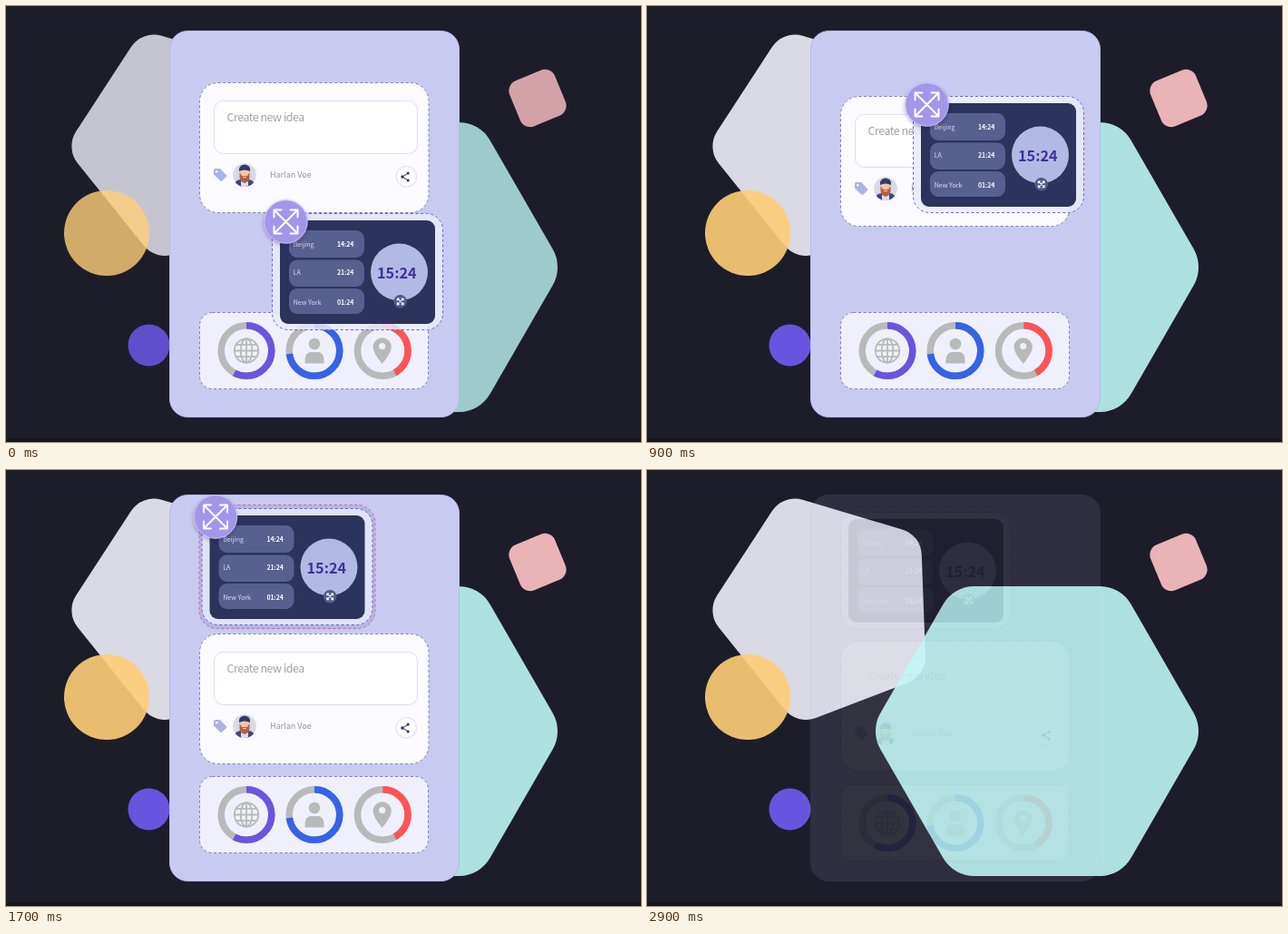
Animation of 700x480 px, one loop 3.2 s. Source, as an HTML page:

```html
<!DOCTYPE html>
<html lang="en">
<head>
<meta charset="utf-8">
<title>Dashboard widgets</title>
<style>
  html, body { margin: 0; width: 100%; height: 100%; overflow: hidden; background: #1d1d2a; }
  svg { display: block; width: 700px; height: 480px; }
  text { font-family: "Noto Sans CJK SC", "Noto Sans", sans-serif; }
  .dash { stroke-width: 1; stroke-dasharray: 3 2.6; }
  .place { font-size: 7.1px; font-weight: 500; fill: #d9dcf5; }
  .time { font-size: 7px; font-weight: 700; fill: #fff; letter-spacing: -.1px; }
  .line { fill: none; stroke-linecap: round; stroke-linejoin: round; }
</style>
</head>
<body>
<svg viewBox="0 0 700 480">
  <defs>
    <filter id="soft" x="-30%" y="-30%" width="160%" height="160%">
      <feDropShadow dx="0" dy="2" stdDeviation="2" flood-color="#252050" flood-opacity=".35"/>
    </filter>
    <clipPath id="face"><circle r="13"/></clipPath>
    <path id="expand" class="line" d="M-12 -12L12 12M12 -12L-12 12M-13 -5V-13H-5M5 -13H13V-5M13 5V13H5M-5 13H-13V5"/>
  </defs>
  <rect width="700" height="480" fill="#1d1d2a"/>
  <rect y="476" width="700" height="4" fill="#17151d"/>

  <g id="shapes">
    <path id="pentagon" fill="#eeeff8"/>
    <path id="hexagon" fill="#bdf7f4"/>
    <rect x="-27" y="-27" width="54" height="54" rx="12" fill="#ffc4c8" transform="translate(586 101.5) rotate(-22.5)"/>
    <circle cx="111" cy="250" r="47" fill="#ffcf78"/>
    <circle cx="157.5" cy="373.5" r="23" fill="#725af4"/>
  </g>

  <g id="panel">
    <rect x="180.5" y="27.5" width="319" height="425" rx="20" fill="#c8caf2" stroke="#b5b9ee"/>

    <g id="zone">
      <rect class="dash" width="194" height="136" rx="20" fill="#b2b7ea" stroke="#ee5f70"/>
    </g>

    <g id="card">
      <rect class="dash" x="213.5" y=".5" width="252.5" height="143" rx="20" fill="#fafaff" stroke="#8281a6"/>
      <rect x="229.5" y="20.5" width="224" height="58" rx="10" fill="#fff" stroke="#dddeec"/>
      <text x="243.5" y="43" font-size="12.4" letter-spacing="-.45" fill="#a0a1a9">Create new idea</text>
      <path d="M230.5 95H236L243 102.2Q243.8 103.2 243 104L238.2 108.6Q237.2 109.4 236.2 108.5L229 101.5V96.5Q229 95 230.5 95Z" fill="#aab3e3"/>
      <circle cx="232.3" cy="98.3" r="1.3" fill="#fafaff"/>
      <g transform="translate(263 102)" clip-path="url(#face)">
        <circle r="13" fill="#d8d9e4"/>
        <path d="M-12 14Q-11 5 -4 5H4Q11 5 12 14Z" fill="#41467d"/>
        <path d="M-4 4.5L0 9L4 4.5V14H-4Z" fill="#d9dcf2"/>
        <rect x="-5" y="-6" width="10" height="9" rx="3" fill="#f3c6a5"/>
        <path d="M-5.5 -3L-3 1H3L5.5 -3V3Q5 8 0 8.5Q-5 8 -5.5 3Z" fill="#b5613f"/>
        <path d="M-1.8 2.6H1.8" stroke="#f3d9cc" stroke-width="1"/>
        <path d="M-6 -4Q-7 -11 0 -11.5Q7 -11 6 -4Q0 -7 -6 -4Z" fill="#353a6b"/>
      </g>
      <text x="291" y="105" font-size="9" font-weight="500" fill="#94959f">Harlan Voe</text>
      <circle cx="441.3" cy="103.8" r="11.2" fill="#fff" stroke="#d9daea"/>
      <path class="line" d="M443.5 100L437 104L443.5 108" stroke="#2c335c" stroke-width="1"/>
      <g fill="#2c335c">
        <circle cx="443.2" cy="100" r="1.5"/><circle cx="437" cy="104" r="1.7"/><circle cx="443.2" cy="108" r="1.5"/>
      </g>
    </g>

    <g id="stats">
      <rect class="dash" x="213.5" y=".5" width="252" height="84" rx="14" fill="#f0f0fd" stroke="#8281a6"/>
      <g id="rings" fill="none" stroke-width="7.5"></g>
      <g class="line" stroke="#b9b9b9" stroke-width="1.8" transform="translate(265 42.5)">
        <circle r="13.2"/><ellipse rx="6.3" ry="13.2"/>
        <path d="M0 -13V13M-13 0H13M-11 -6.6H11M-11 6.6H11"/>
      </g>
      <g fill="#b9b9b9">
        <circle cx="340" cy="35" r="6.3"/>
        <path d="M329.5 56.5V53Q329.5 44 337 44H343.500Q350.5 44 350.5 53V56.500Z"/>
        <path fill-rule="evenodd" d="M414.700 57Q404.500 44.500 404.500 38.500A10.200 10.200 0 0 1 424.900 38.500Q424.900 44.500 414.700 57ZM411.200 37.500a3.500 3.500 0 1 0 7 0a3.500 3.500 0 1 0 -7 0Z"/>
      </g>
    </g>

    <g id="widget">
      <rect class="dash" x="-8.500" y="-7.500" width="188" height="128" rx="18" fill="#e9ebfb" fill-opacity=".85" stroke="#6d63cc"/>
      <rect width="171" height="114" rx="9" fill="#2c335c"/>
      <g id="rows"></g>
      <circle cx="131.500" cy="57" r="31.500" fill="#b2b9e4"/>
      <text x="107" y="64" font-size="16.300" font-weight="700" fill="#41309a">15:24</text>
      <circle cx="132.700" cy="89.300" r="7.300" fill="#515988"/>
      <use href="#expand" transform="translate(132.700 89.300) scale(.26)" stroke="#fff" stroke-width="4"/>
      <g id="handle">
        <circle r="23.700" fill="#a396ea" stroke="#c9c0f4" filter="url(#soft)"/>
        <use href="#expand" stroke="#fff" stroke-width="2"/>
      </g>
    </g>
  </g>
</svg>

<script>
const LOOP = 3200, STEP = 100;
const $ = id => document.getElementById(id);

function add(parent, tag, attrs, text = '') {
  const node = document.createElementNS('http://www.w3.org/2000/svg', tag);
  for (const key in attrs) node.setAttribute(key, attrs[key]);
  node.textContent = text;
  parent.append(node);
}

// Polygon with every corner replaced by an arc of the given radius.
function roundedPath(points, radius) {
  const count = points.length;
  return points.map(([x, y], i) => {
    const a = points[(i + count - 1) % count], b = points[(i + 1) % count];
    const ua = Math.atan2(a[1] - y, a[0] - x), ub = Math.atan2(b[1] - y, b[0] - x);
    const angle = Math.acos(Math.cos(ua - ub));
    const cut = radius / Math.tan(angle / 2);
    const at = u => `${x + cut * Math.cos(u)} ${y + cut * Math.sin(u)}`;
    return `${i ? 'L' : 'M'}${at(ua)}A${radius} ${radius} 0 0 1 ${at(ub)}`;
  }).join('') + 'Z';
}

$('pentagon').setAttribute('d', roundedPath(
  [[150, 26.5], [302, 71.6], [307.7, 226.5], [165.5, 280.8], [65.4, 156.3]], 30));
$('hexagon').setAttribute('d', roundedPath(
  Array.from({ length: 6 }, (_, i) => {
    const a = i * Math.PI / 3;
    return [430 + 184.2 * Math.cos(a), 287.5 + 184.2 * Math.sin(a)];
  }), 40));

for (const [cx, color, share] of [[265, '#6a54e0', 58], [340, '#3563e9', 73], [415.3, '#fe5354', 42]]) {
  const ring = { cx, cy: 42.5, r: 27.8 };
  add($('rings'), 'circle', { ...ring, stroke: '#b9b9b9' });
  add($('rings'), 'circle', {
    ...ring, stroke: color, pathLength: 100,
    'stroke-dasharray': `${share} 100`, transform: `rotate(-90 ${cx} 42.5)`
  });
}

for (const [place, time, y, height, base] of [
  ['Beijing', '14:24', 11, 30, 29], ['LA', '21:24', 43.5, 29.5, 59.5], ['New York', '01:24', 75, 28, 92.7]
]) {
  add($('rows'), 'rect', { x: 10, y, width: 83, height, rx: 9, fill: '#58608f' });
  add($('rows'), 'text', { x: 14.7, y: base, class: 'place' }, place);
  add($('rows'), 'text', { x: 63, y: base === 59.5 ? 60 : base, class: 'time' }, time);
}

// Rows of [time, ...values], linear in between.
const tracks = {
  widget: [[400, 302, 236], [500, 302, 215], [900, 302, 107], [1000, 302, 85], [1100, 292, 81],
    [1400, 248, 71], [1500, 240, 66], [1600, 232, 60], [1700, 224.5, 50], [1900, 224.5, 50],
    [2000, 223, 52], [2100, 222, 54]],
  card: [[800, 84], [900, 99], [1000, 128], [1100, 157], [1200, 174], [1300, 180], [2300, 180], [2400, 188]],
  stats: [[2300, 337], [2400, 346]],
  zone: [[1000, .6, 0], [1300, .82, 1], [1400, .87, 1], [1600, 1, 1], [2300, 1, 1], [2400, 1, 0]],
  handle: [[1900, 1, 1], [2000, 1.08, .6], [2100, 1.08, 0]],
  shapes: [[400, .8], [500, .9]],
  panel: [[2800, 1], [2900, .1]]
};

function sample(track, t) {
  const next = track.findIndex(row => row[0] > t);
  if (next === 0) return track[0].slice(1);
  if (next < 0) return track[track.length - 1].slice(1);
  const a = track[next - 1], b = track[next];
  const k = (t - a[0]) / (b[0] - a[0]);
  return a.slice(1).map((v, i) => v + (b[i + 1] - v) * k);
}

const move = (id, value) => $(id).setAttribute('transform', value);

function draw(t) {
  const at = name => sample(tracks[name], t);
  move('widget', `translate(${at('widget')})`);
  move('card', `translate(0 ${at('card')[0]})`);
  move('stats', `translate(0 ${at('stats')[0]})`);

  const [zoneScale, zoneAlpha] = at('zone');
  move('zone', `translate(213 ${106.5 - 68 * zoneScale}) scale(${zoneScale})`);
  $('zone').style.opacity = zoneAlpha;

  const [handleScale, handleAlpha] = at('handle');
  move('handle', `translate(6.5 1.5) scale(${handleScale})`);
  $('handle').style.opacity = handleAlpha;

  for (const shape of $('shapes').children) shape.style.opacity = at('shapes')[0];
  $('panel').style.opacity = at('panel')[0];
}

const start = performance.now();
function tick() {
  const t = (performance.now() - start) % LOOP;
  draw(Math.floor(t / STEP) * STEP);
  requestAnimationFrame(tick);
}
tick();
</script>
</body>
</html>
```
